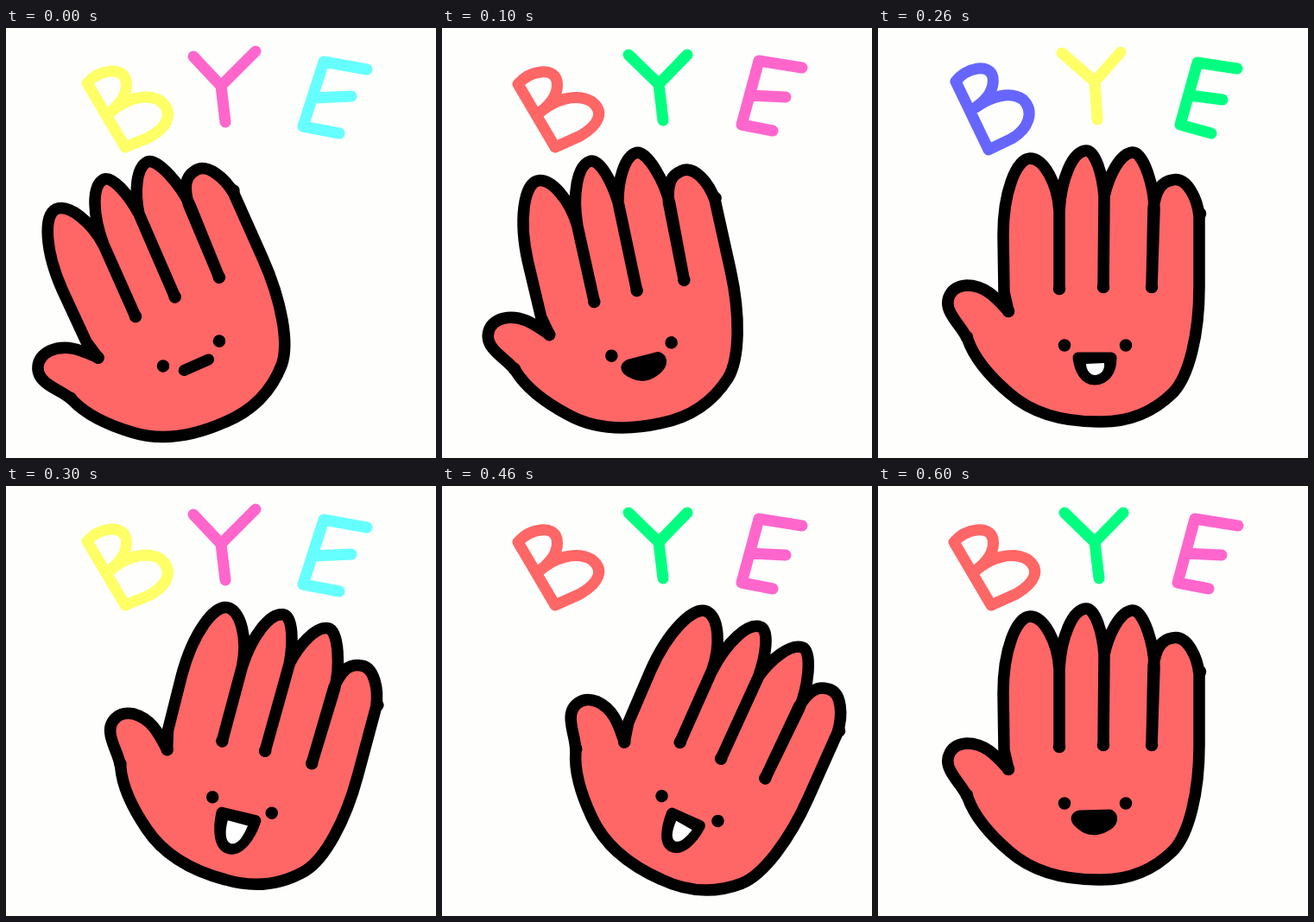
An HTML page that plays this animation: 498 px wide and 498 px high, repeating every 0.7 s.

```html
<!DOCTYPE html>
<html lang="en">
<head>
<meta charset="utf-8">
<title>Waving hand</title>
<style>
  html, body { margin: 0; width: 100%; height: 100%; overflow: hidden; background: #fefffd; }
  svg { display: block; width: 100%; height: 100%; }
  path { fill: none; stroke-linecap: round; stroke-linejoin: round; stroke-width: 13; }
  #hand { stroke: #000; }
  #skin { fill: #f66; stroke-width: 13.5; }
  #dots { stroke-width: 14.5; }
  #mouth { fill: #000; }
  #teeth { fill: #fff; stroke: none; }
</style>
</head>
<body>
<svg viewBox="0 0 498 498">
  <path id="B"/><path id="Y"/><path id="E"/>
  <g id="hand">
    <path id="skin" d="M151 328C138 314 125 298 103 298C84 299 76 315 84 330C91 343 98 348 104 361
      C110 378 124 399 152 423C178 446 215 456 255 456C295 457 322 442 342 422C360 403 372 355 372 300
      L372 218C370 198 358 172 341 176C328 178 322 188 319 208L317 300
      L320 210C320 185 308 144 295 144C280 145 267 172 262 195L261 300
      L262 195C260 170 252 142 241 142C225 143 212 175 210 212L210 302
      L210 212C208 180 192 151 176 151C160 152 145 190 145 240L146 306Z"/>
    <path id="dots" d="M216 367.5h0M287 367.5h0M151 328h0M210 302h0M261 300h0M317 300h0M373 215h0M103 358h0"/>
    <path id="mouth"/><path id="teeth"/>
  </g>
</svg>
<script>
const $ = id => document.getElementById(id);
const set = (id, attrs) => {
  for (const key in attrs) $(id).setAttribute(key, attrs[key]);
};

const [yellow, pink, cyan, coral, green, blue] =
  ['#ff6', '#f6c', '#6ff', '#f66', '#00ff80', '#66f'];

// Three hand-drawn versions of the word, cycled in turn
const words = [
  {
    B: [yellow, 'M138 138L94 64C108 48 135 44 139 61C142 78 130 90 118 100C135 84 160 74 178 84C195 97 188 115 165 127L138 138'],
    Y: [pink, 'M217 33L249 67L289 27M249 67L254 109'],
    E: [cyan, 'M418 48L368 39L344 114L386 122M357 81L400 79']
  },
  {
    B: [coral, 'M131 138L88 65C102 49 129 45 133 61C136 77 125 89 113 98C130 83 155 75 173 85C189 97 182 112 160 125L131 138'],
    Y: [green, 'M216 31L251 65L284 31M251 65L256 107'],
    E: [pink, 'M417 46L367 38L347 112L383 119M356 78L398 80']
  },
  {
    B: [blue, 'M128 141L90 62C102 46 129 40 133 57C135 72 125 84 113 92C130 80 153 72 168 83C182 97 174 117 155 128L128 141'],
    Y: [yellow, 'M213 29L251 62L281 28M251 62L254 106'],
    E: [green, 'M416 47L370 40L350 112L386 122M361 78L399 83']
  }
];

// Hand pose: angle, then the point midway between the eyes
const poses = {
  farLeft: [-24, 214.5, 377],
  left: [-12.5, 231, 372],
  up: [0, 251.5, 367.5],
  right: [15, 273.5, 369.5],
  farRight: [24, 287, 373.5]
};

// Mouth outline, then the white inside
const mouths = {
  flat: ['M236 382H267', ''],
  round: ['M234 382L268 381C274 385 269 391 263 394C254 399 244 399 237 393C229 388 228 383 234 382Z', ''],
  smile: ['M232 382L270 382C270 398 262 407 251 407C240 407 234 396 232 382Z',
    'M241 389L262 388C263 397 257 402 251 402C246 402 241 396 241 389Z'],
  laugh: ['M231 382L271 381C270 400 262 420 250 420C238 420 232 402 231 382Z',
    'M240 389L264 389C262 404 258 414 250 414C243 413 240 402 240 389Z'],
  cheer: ['M235 381L270 381C269 399 262 416 251 416C241 416 236 400 235 381Z',
    'M243 387L264 389C261 400 258 409 251 409C245 408 243 398 243 387Z'],
  grin: ['M236 381L271 379C278 390 270 398 258 401C242 403 230 398 236 381Z',
    'M241 387L266 385L270 393Q256 397 243 396Z']
};

const steps = [
  ['farLeft', 'flat'], ['left', 'round'], ['up', 'smile'], ['right', 'laugh'],
  ['farRight', 'cheer'], ['right', 'grin'], ['up', 'round']
];
const stepMs = 100;

function draw(now) {
  const i = Math.floor((now - start) / stepMs) % steps.length;
  const [pose, mouth] = steps[i];
  const [angle, x, y] = poses[pose];
  const word = words[i === 6 ? 1 : i % 3];

  for (const letter in word) {
    const [stroke, d] = word[letter];
    set(letter, { stroke, d });
  }
  set('hand', { transform: `translate(${x} ${y}) rotate(${angle}) translate(-251.5 -367.5)` });
  set('mouth', { d: mouths[mouth][0] });
  set('teeth', { d: mouths[mouth][1] });
}

const start = performance.now();
function tick() {
  draw(performance.now());
  requestAnimationFrame(tick);
}
tick();
</script>
</body>
</html>
```
